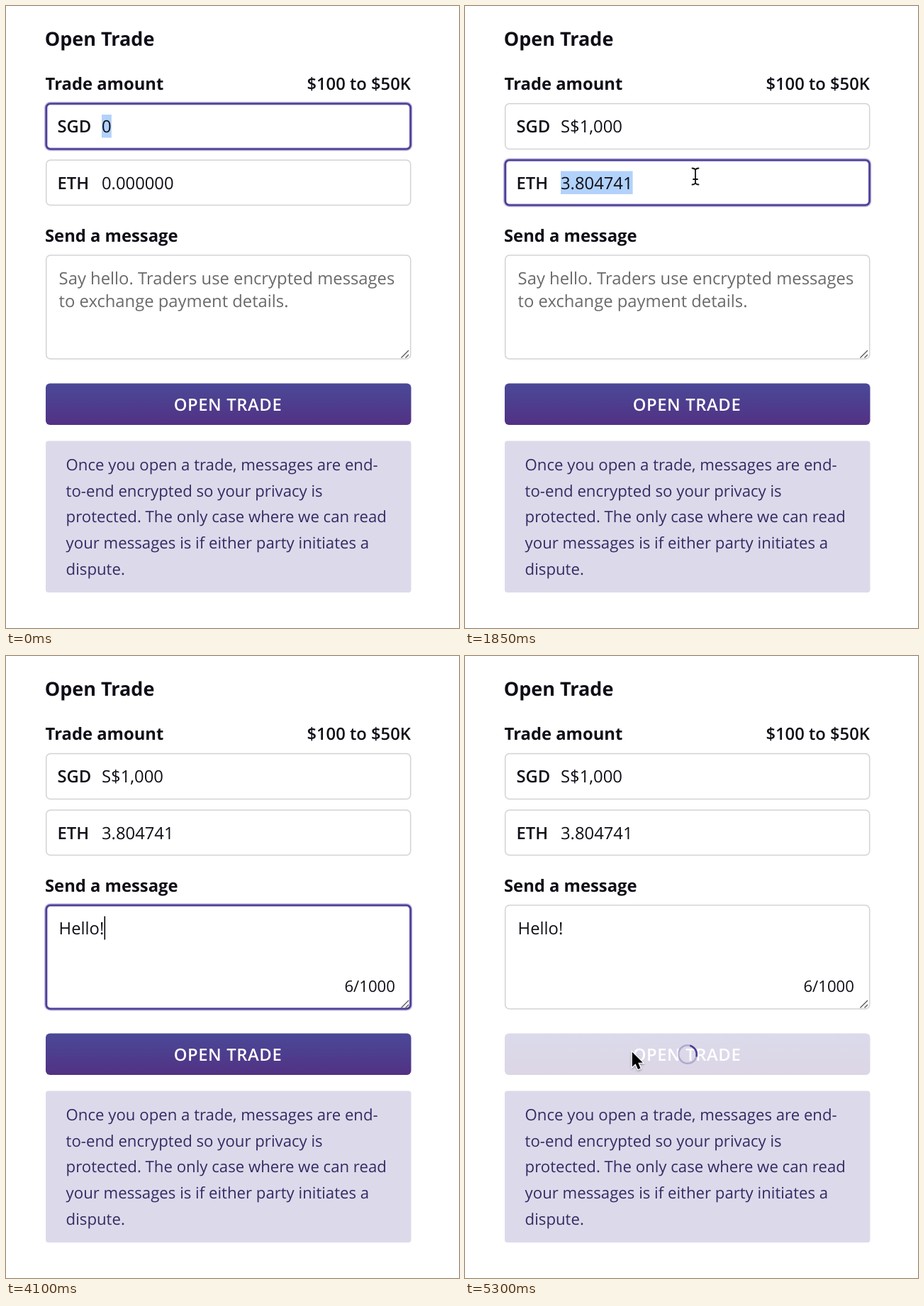
These frames come from a looping animation (639 by 876 pixels, 5.35 s). An HTML page:

```html
<!DOCTYPE html>
<html lang="en">
<head>
<meta charset="utf-8">
<title>Open Trade</title>
<style>
html, body { margin: 0; width: 100%; height: 100%; overflow: hidden; background: #fff; }
svg { display: block; width: 639px; height: 876px; }
text { font: 23.8px "Open Sans", sans-serif; fill: #0f0e17; text-rendering: geometricPrecision; white-space: pre; }
.title { font-size: 27px; font-weight: 700; }
.label { font-weight: 700; }
.semi { font-weight: 600; }
.small { font-size: 22.2px; }
.hint { fill: #6a6a6a; }
.note { font-size: 22.2px; fill: #352a64; }
.cta { font-weight: 600; letter-spacing: .6px; fill: #fff; }
.box { fill: #fff; stroke: #d3d3d5; stroke-width: 1.5; }
.ring rect { fill: none; }
.glow { stroke: #c5c0e4; stroke-width: 5; }
.edge { stroke: #4a3f94; stroke-width: 2.6; }
.sel { fill: #b1d2fb; }
</style>
</head>
<body>
<svg viewBox="0 0 639 876">
  <defs>
    <linearGradient id="base" x2="0" y2="1">
      <stop stop-color="#4a4998"/><stop offset="1" stop-color="#523183"/>
    </linearGradient>
    <linearGradient id="hover" x2="0" y2="1">
      <stop stop-color="#5d589f"/><stop offset="1" stop-color="#63478f"/>
    </linearGradient>
    <filter id="shade" x="-50%" y="-50%" width="200%" height="200%">
      <feDropShadow dx="0" dy="1.5" stdDeviation="1.4" flood-opacity=".35"/>
    </filter>
  </defs>

  <text class="title" x="54.7" y="56">Open Trade</text>
  <text class="label" x="55.6" y="118">Trade amount</text>
  <text class="semi" x="571" y="118" text-anchor="end">$100 to $50K</text>
  <text class="label" x="55" y="331.5">Send a message</text>

  <g id="fields"></g>

  <rect class="sel" id="fiatSel" x="135" y="153" width="13.8" height="32.5"/>
  <rect class="sel" id="coinSel" x="135" y="232.5" height="32.5"/>
  <text class="semi" x="72.5" y="178.3">SGD</text>
  <text id="fiat" x="135" y="178.3"></text>
  <text class="semi" x="72.5" y="257.8">ETH</text>
  <text id="coin" x="135" y="257.8"></text>

  <g id="hint">
    <text class="hint" x="74.6" y="392">Say hello. Traders use encrypted messages</text>
    <text class="hint" x="74.6" y="424.4">to exchange payment details.</text>
  </g>
  <text id="msg" x="74.6" y="392"></text>
  <text id="count" class="small" x="549" y="473" text-anchor="end"></text>
  <path d="M557.5 495.5L568 485M563.5 495.5L568 491" stroke="#555" stroke-width="1.3"/>
  <rect id="caret" width="1.6" height="33"/>

  <g id="button">
    <rect id="face" x="56" y="531.5" width="515.5" height="58.5" rx="6" fill="url(#base)"/>
    <rect id="lit" x="56.7" y="532.2" width="514.1" height="57.1" rx="5.5" fill="url(#hover)" stroke="#4b3b8c" stroke-width="1.4"/>
    <text class="cta" x="313" y="569.7" text-anchor="middle">OPEN TRADE</text>
  </g>
  <g id="spinner" fill="none" stroke-width="2.6">
    <circle cx="314" cy="561" r="12.8" stroke="#4a3f94" stroke-opacity=".3"/>
    <path id="arc" d="M304.95 551.95A12.8 12.8 0 0 1 323.05 551.95" stroke="#4a3f94"/>
  </g>

  <rect x="56" y="612.5" width="515.5" height="213.5" rx="4" fill="#dcdaea"/>
  <g id="notes"></g>

  <g id="beam" fill="none" stroke-linecap="round">
    <path id="beamShape" d="M-4.5 -11.5Q-.8 -11.5 0 -9Q.8 -11.5 4.5 -11.5M0 -9V9M-4.5 11.5Q-.8 11.5 0 9Q.8 11.5 4.5 11.5M-3 4H3" stroke="#fff" stroke-width="3.6"/>
    <use href="#beamShape" style="--w:2"/>
    <path d="M-4.5 -11.5Q-.8 -11.5 0 -9Q.8 -11.5 4.5 -11.5M0 -9V9M-4.5 11.5Q-.8 11.5 0 9Q.8 11.5 4.5 11.5M-3 4H3" stroke="#111" stroke-width="1.8"/>
  </g>
  <g id="arrow" filter="url(#shade)">
    <path d="M.8 .8V21.6L5.6 17.2L9 25L12.6 23.4L9.2 15.8H15.8Z" stroke="#fff" stroke-width="2.4" paint-order="stroke"/>
  </g>
  <g id="hand" filter="url(#shade)" stroke="#111" stroke-linejoin="round" stroke-linecap="round">
    <path transform="translate(-5 -1)" d="M3.5 3.2C3.5 1 6.6 .6 7.4 3L9.4 9.2C10.5 8 12.4 8.4 13 9.6C14 8.6 16 9 16.5 10.4C17.8 9.6 20 10.4 20.2 12.4C20.6 16 20 18.5 18.8 20.6L18.6 23.5H9.6C9 20.5 6.5 19 4.6 17C3 15.3 .4 13.2 1.2 11.8C2.2 10.4 4.6 11.6 6.4 13.4Z" fill="#fff" stroke-width="1.7"/>
    <path transform="translate(-5 -1)" d="M10.7 14.8L11 19.6M13.4 14.8L13.6 19.6M16.1 14.8V19.6" fill="none" stroke-width="1.4"/>
  </g>
</svg>
<script>
const LOOP = 5350, STEP = 50;
const $ = id => document.getElementById(id);
const show = (id, on) => $(id).style.display = on ? '' : 'none';
const clamp = x => Math.max(0, Math.min(1, x));

// Field frames with their focus rings
const fieldBoxes = { fiat: [137.5, 64], coin: [217, 63.5], msg: [351, 146] };
$('fields').innerHTML = Object.entries(fieldBoxes).map(([name, [y, h]]) => {
  const rect = (cls, grow) =>
    `<rect class="${cls}" x="${56.7 - grow}" y="${y - grow}" width="${514 + 2 * grow}" height="${h + 2 * grow}" rx="6"/>`;
  return rect('box', 0) + `<g class="ring" id="ring-${name}">${rect('glow', .2)}${rect('edge', 0)}</g>`;
}).join('');

$('notes').innerHTML = [
  'Once you open a trade, messages are end-',
  'to-end encrypted so your privacy is',
  'protected. The only case where we can read',
  'your messages is if either party initiates a',
  'dispute.'
].map((s, i) => `<text class="note" x="84.6" y="${653.8 + i * 36.75}">${s}</text>`).join('');

const amountKeys = [500, 700, 850, 1000];
const messageKeys = [2850, 3000, 3200, 3450, 3650, 4050];
const TAB = 1600, CLICK_MSG = 2150, HOVER = 4350, PRESS = 4950;

// Pointer: time, x, y, shape until the next step
const pointer = [
  [1850, 325, 240, 'beam'], [2100, 335, 400, 'beam'], [2350, 340, 448, 'beam'],
  [2850, 340, 448, ''], [4250, 340, 448, 'beam'], [4350, 215, 535, 'hand'],
  [4450, 102, 590, 'arrow'], [4600, 100, 590, 'arrow'], [4650, 120, 583, 'hand'],
  [4800, 205, 552, 'hand'], [5000, 205, 552, 'arrow'], [5300, 235, 557, 'arrow']
];

const typed = (keys, t) => keys.filter(k => k <= t).length;

function placePointer(t) {
  const i = pointer.findLastIndex(p => p[0] <= t);
  const a = pointer[i], b = pointer[i + 1] || a;
  for (const shape of ['beam', 'arrow', 'hand']) show(shape, a && a[3] === shape);
  if (!a || !a[3]) return;
  const k = a === b ? 0 : (t - a[0]) / (b[0] - a[0]);
  $(a[3]).setAttribute('transform', `translate(${a[1] + (b[1] - a[1]) * k} ${a[2] + (b[2] - a[2]) * k})`);
}

function placeCaret(t, focus, digits) {
  const keys = focus === 'fiat' ? amountKeys : [CLICK_MSG, ...messageKeys];
  const last = keys.findLast(k => k <= t) || 0;
  const on = focus === 'msg' || focus === 'fiat' && digits > 0;
  show('caret', on && (t - last) % 1000 < 500);
  if (!on) return;
  const field = $(focus);
  const width = field.textContent ? field.getComputedTextLength() : 0;
  $('caret').setAttribute('x', +field.getAttribute('x') + width + .2);
  $('caret').setAttribute('y', focus === 'fiat' ? 153 : 366.5);
}

function draw(t) {
  const digits = typed(amountKeys, t), letters = typed(messageKeys, t);
  const amount = '1000'.slice(0, digits);
  const focus = t < TAB ? 'fiat' : t < CLICK_MSG ? 'coin' : t < PRESS ? 'msg' : '';

  $('fiat').textContent = t >= TAB ? 'S$1,000' : amount || '0';
  $('coin').textContent = (amount * .003804741).toFixed(6);
  $('msg').textContent = 'Hello!'.slice(0, letters);
  $('count').textContent = letters ? letters + '/1000' : '';
  show('hint', !letters);
  show('fiatSel', !digits);
  show('coinSel', focus === 'coin');
  $('coinSel').setAttribute('width', $('coin').getComputedTextLength());
  for (const name in fieldBoxes) show('ring-' + name, focus === name);
  placeCaret(t, focus, digits);

  const busy = clamp((t - PRESS) / 150);
  const lift = t < PRESS ? clamp((t - HOVER) / 200) : 1 - busy;
  $('button').setAttribute('transform', `translate(0 ${-1.5 * lift})`);
  $('lit').setAttribute('opacity', t < PRESS ? lift : 0);
  $('face').setAttribute('opacity', 1 - .8 * busy);
  show('spinner', t >= PRESS + 50);
  $('arc').setAttribute('transform', `rotate(${(t - 5050) * .24} 314 561)`);
  placePointer(t);
}

function tick() {
  draw(Math.floor(performance.now() % LOOP / STEP) * STEP);
  requestAnimationFrame(tick);
}
tick();
</script>
</body>
</html>
```
